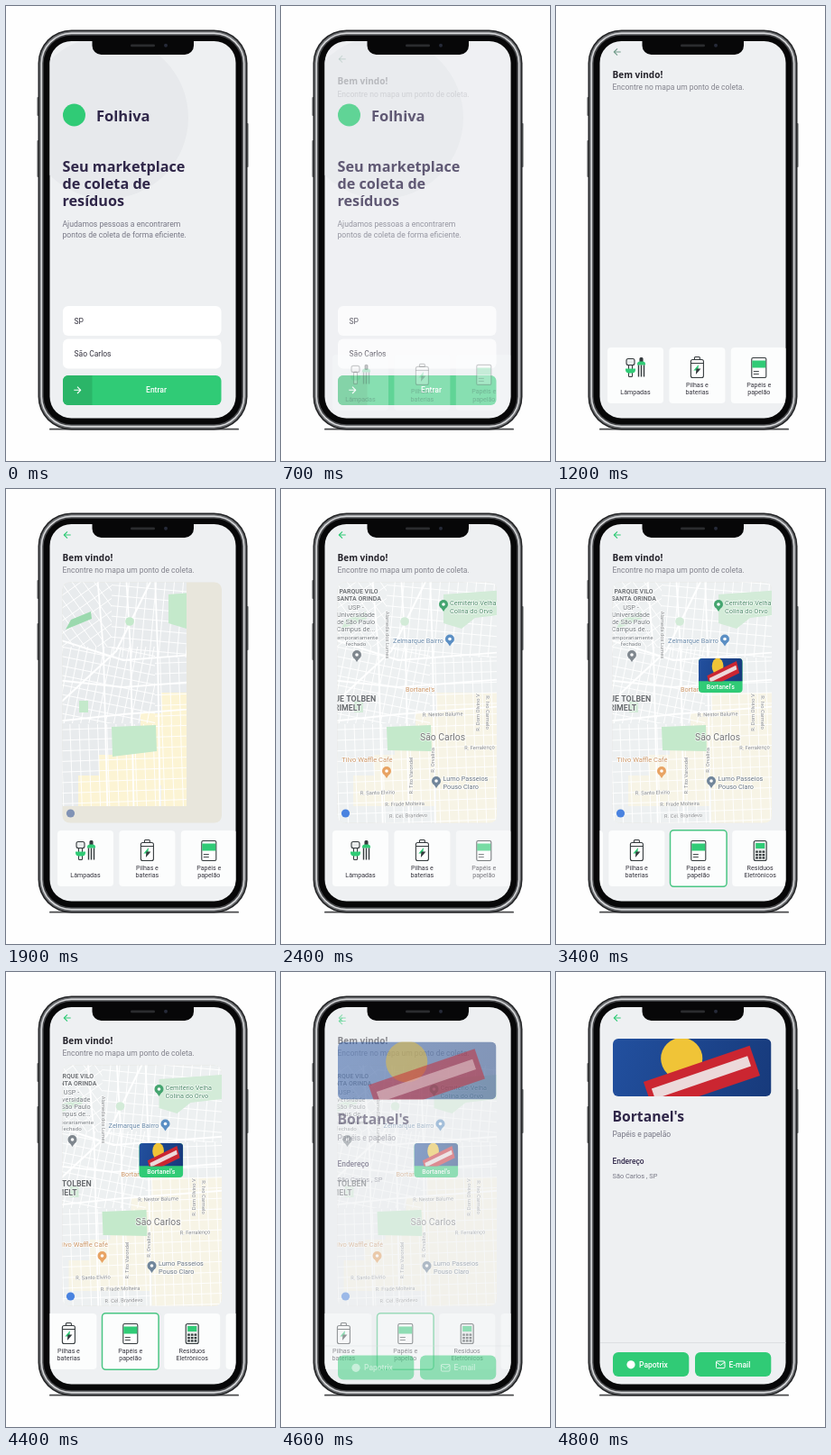
These frames come from a looping animation (298 px wide and 505 px high, 5.5 s). An HTML page with a canvas:

```html
<!DOCTYPE html>
<html lang="pt-BR">
<head>
<meta charset="utf-8">
<title>Coleta de resíduos</title>
<style>
html, body { margin: 0; width: 100%; height: 100%; overflow: hidden; background: #fefefe; }
canvas { display: block; width: 100vw; height: 100vh; }
</style>
</head>
<body>
<canvas id="stage"></canvas>
<script>
const W = 298, H = 505, LOOP = 5500, TICK = 100;
const canvas = document.getElementById('stage');
const c = canvas.getContext('2d');
const SANS = 'Roboto, sans-serif', HEAD = '"Noto Sans", sans-serif';
const GREEN = '#30cb76', INK = '#302749', GREY = '#777785', DARK = '#343a3d', PAGE = '#eef0f2';
const LEFT = 63, WIDTH = 175.5;
const SHOP = "Bortanel's";
const bold = { weight: 700, font: HEAD };

// Progress of a move that shows `count` ticks from `start`, waits, then settles at `end`
function burst(t, start, count, end) {
  if (t < start) return 0;
  if (t >= end) return 1;
  return Math.min(count, Math.floor((t - start) / TICK) + 1) / (count + 1);
}
const easeOut = p => 1 - Math.pow(1 - p, 1.78);

// ---- drawing helpers ----

function layer(draw, alpha = 1) {
  c.save();
  c.globalAlpha *= alpha;
  draw();
  c.restore();
}

function at(x, y, angle, draw) {
  layer(() => {
    c.translate(x, y);
    c.rotate(angle);
    draw();
  });
}

function box(x, y, w, h, r, fill, stroke, width = 1) {
  c.beginPath();
  c.roundRect(x, y, w, h, r);
  if (fill) { c.fillStyle = fill; c.fill(); }
  if (stroke) { c.strokeStyle = stroke; c.lineWidth = width; c.stroke(); }
}

function clipBox(x, y, w, h, r, draw) {
  layer(() => {
    box(x, y, w, h, r);
    c.clip();
    draw();
  });
}

function disc(x, y, r, fill) {
  c.beginPath();
  c.arc(x, y, r, 0, 7);
  c.fillStyle = fill;
  c.fill();
}

function trace(pts) {
  c.beginPath();
  for (let i = 0; i < pts.length; i += 2) c.lineTo(pts[i], pts[i + 1]);
}

function poly(pts, fill) {
  trace(pts);
  c.fillStyle = fill;
  c.fill();
}

function line(pts, color, width = 1) {
  trace(pts);
  c.strokeStyle = color;
  c.lineWidth = width;
  c.stroke();
}

function text(s, x, y, size, color, { weight = 400, font = SANS, align = 'left', halo = 0, gap = size * 1.2 } = {}) {
  c.font = `${weight} ${size}px ${font}`;
  c.textAlign = align;
  c.strokeStyle = 'rgba(255,255,255,.8)';
  c.lineWidth = halo;
  c.fillStyle = color;
  s.split('\n').forEach((row, i) => {
    if (halo) c.strokeText(row, x, y + i * gap);
    c.fillText(row, x, y + i * gap);
  });
}

function arrow(x, y, dir, color) {
  const r = 3.7;
  line([x - dir * r, y, x + dir * r, y], color, 1.1);
  line([x, y - r, x + dir * r, y, x, y + r], color, 1.1);
}

function page() {
  c.fillStyle = PAGE;
  c.fillRect(45, 36, 214, 426);
}

// ---- phone ----

function phoneBody() {
  box(48, 468.8, 210, 1.8, 1, '#4a4b4d');
  box(34.4, 101, 2, 21, 1, '#707275');
  box(34.4, 149, 2, 41, 1, '#707275');
  box(266.6, 130, 2, 49, 1, '#707275');
  ['#232426', '#6f7174', '#d9dadc', '#47484b', '#070708'].forEach((color, i) => {
    const inset = i * 1.55;
    box(35.5 + inset, 26.5 + inset, 232 - 2 * inset, 444 - 2 * inset, 37 - inset, color);
  });
}

function notch() {
  box(95.5, 36, 112.5, 18, [0, 0, 10, 10], '#070708');
  box(138, 42.6, 27, 2.6, 1.3, '#2b2c2f');
  disc(177, 43.8, 2, '#262a38');
}

// ---- home screen ----

function home() {
  page();
  disc(112, 124, 90, '#e7e9ec');
  disc(75.5, 121, 12.5, GREEN);
  text('Folhiva', 100, 127.5, 16.5, INK, bold);
  text('Seu marketplace\nde coleta de\nresíduos', 62.5, 183.5, 16.2, INK, bold);
  text('Ajudamos pessoas a encontrarem\npontos de coleta de forma eficiente.', 62.5, 244.5, 8.6, GREY, { gap: 12.7 });
  ['SP', 'São Carlos'].forEach((s, i) => {
    box(LEFT, 333 + i * 36.5, WIDTH, 33, 6, '#fff');
    text(s, 75.5, 352.6 + i * 36.5, 8.5, '#35333f');
  });
  box(LEFT, 410, WIDTH, 33, 6, GREEN);
  box(LEFT, 410, 32.5, 33, [6, 0, 0, 6], '#2bb568');
  arrow(79, 426.3, 1, '#fff');
  text('Entrar', 166.5, 429.3, 8.5, '#fff', { weight: 500, align: 'center' });
}

// ---- map ----

function grid(x, y, w, h, angle, step) {
  clipBox(x, y, w, h, 0, () => at(x, y, angle, () => {
    for (let d = -280; d < 280; d += step) {
      line([d, -280, d, 280], '#fff', .9);
      line([-280, d * 1.15, 280, d * 1.15], '#fff', .9);
    }
  }));
}

function ground(labelled) {
  const park = '#c4e9cb', pale = labelled ? '#d3ebd8' : park;
  c.fillStyle = labelled ? '#edf0f1' : '#e8ebed';
  c.fillRect(55, 95, 205, 285);
  // shopping area, widening in steps towards the south
  c.fillStyle = labelled ? '#f7f4e6' : '#fcf4d4';
  for (let i = 0; i < 5; i++) c.fillRect(172 - i * 23, 226 + i * 23, 90, 34);
  c.fillRect(172, 226, 90, 150);
  grid(55, 95, 62, 80, -.62, 10);
  grid(117, 95, 145, 92, .09, 10);
  grid(55, 175, 110, 85, .2, 9);
  grid(165, 187, 95, 75, -.035, 10.2);
  grid(55, 261, 205, 120, -.035, 10.2);
  for (let i = 0; i < 3; i++) {
    line([55, 166 + i * 46, 130, 190 + i * 30, 260, 180 + i * 30], '#fff', 1.9);
    line([101 + i * 32, 95, 108 + i * 30, 180, 113 + i * 29, 380], '#fff', 1.8);
  }
  line([55, 242, 122, 180, 164, 95], '#fff', 2);
  poly([66, 156, 72, 145, 94, 136, 95, 144], labelled ? pale : '#9bd9ae');
  disc(137, 147, 4.8, pale);
  poly([180, 117, 250, 112, 250, 139, 215, 143, 200, 155, 180, 149], pale);
  box(81, 235, 10, 13, 0, pale);
  poly([117, 264, 166, 262, 167, 291, 118, labelled ? 290 : 297], park);
}

function pin(x, y, color) {
  poly([x - 4.3, y + 1.5, x + 4.3, y + 1.5, x, y + 8], color);
  disc(x, y, 5, color);
  disc(x, y, 1.8, '#fff');
}

function street(s, x, y, angle = -.03) {
  at(x, y, angle, () => text(s, 0, 2, 5.8, '#85888b', { align: 'center', halo: 1.2 }));
}

function places() {
  const up = -Math.PI / 2;
  street('R. Nestor Balume', 179, 250);
  street('R. Ferralenço', 220, 287);
  street('R. Santo Elvírio', 107, 337);
  street('R. Frade Molteira', 137, 349.5);
  street('R. Cel. Brandevo', 141, 362.5);
  street('R. Orvalina', 168, 301, up);
  street('R. Tito Varondel', 144, 318, up);
  street('R. Dom Olvino V', 218, 248, up);
  street('R. Ivo Carmelo', 229, 248, -up);
  street('Alameda dos Lumes', 118, 162, -up);

  const left = { halo: 1.5 }, right = { halo: 1.5, align: 'right' };
  const mid = { halo: 1.5, align: 'center' }, area = { ...mid, weight: 700 };
  text('PARQUE VILO\nSANTA ORINDA', 86, 116, 7, '#6f7377', area);
  text('USP -\nUniversidade\nde São Paulo\nCampus de...', 83, 133.5, 7.3, '#747a7f', { ...mid, gap: 8.3 });
  text('Temporariamente\nfechado', 83, 166.5, 6.2, '#747a7f', mid);
  pin(84, 184, '#7f878e');
  text('PARQUE TOLBEN\nGRIMELT', 71, 235.5, 8.8, '#666a6e', area);
  text('São Carlos', 179, 279, 10.4, '#747474', mid);

  pin(180, 128, '#45a570');
  text('Cemitério Velha\nColina do Orvo', 187, 129, 7.3, '#4b8a68', left);
  text('Zelmarque Bairro', 180, 171, 7.3, '#6788a8', right);
  pin(187, 166.5, '#5b8fc4');
  text('Tilvo Waffle Café', 123.5, 302.5, 7.5, '#cb9565', right);
  pin(117, 313, '#e8a363');
  text(SHOP, 138, 225, 7.3, '#cb9565', left);
  pin(172, 324, '#71869b');
  text('Lumo Passeios\nPouso Claro', 179.5, 324, 7.3, '#6a7784', left);
}

function photo(x, y, w, h, r) {
  clipBox(x, y, w, h, r, () => {
    c.translate(x, y);
    c.scale(w / 175, h / 64);
    const sky = c.createLinearGradient(0, 0, 175, 64);
    sky.addColorStop(0, '#22509f');
    sky.addColorStop(1, '#173a7b');
    c.fillStyle = sky;
    c.fillRect(0, 0, 175, 64);
    disc(76, 22, 23, '#f0c437');
    at(98, 44, -.33, () => {
      box(-62, -17, 124, 35, 0, '#cb2631');
      box(-56, -7, 112, 12, 0, '#ecd9da');
    });
  });
}

function marker() {
  box(158, 188, 48.6, 38, 4, GREEN);
  photo(158, 188, 48.6, 25.5, [4, 4, 0, 0]);
  text(SHOP, 182.3, 222, 7, '#fff', { weight: 500, align: 'center' });
}

function map(t, pan) {
  const labelled = t >= 2300;
  clipBox(62.5, 103.5, 176.5, 267, 8, () => {
    c.fillStyle = '#e8e6dc';
    c.fillRect(62, 103, 178, 268);
    // only part of the tiles has arrived before the labels
    const [w, h] = labelled ? [178, 268] : [138, 249];
    clipBox(62, 103, w, h, 0, () => {
      c.translate(-10.5 * pan, 2 * pan);
      ground(labelled);
      if (labelled) places();
      if (t >= 2500) marker();
    });
    disc(71.5, 360, 4.6, labelled ? '#4a83e0' : '#8193b5');
  });
}

// ---- category cards (icons are drawn around the origin) ----

const outline = (x, y, w, h, r, fill = '#fff') => box(x, y, w, h, r, fill, DARK, 1.1);

function lamps() {
  outline(-10, -10, 9, 7, 2, '#e9ecec');
  outline(-7.5, -3, 4, 13, 1);
  box(-11, 1, 11, 5, [0, 0, 4, 4], GREEN);
  outline(5, -11, 3, 5, 1, DARK);
  box(2, -7, 9, 4, [3, 3, 0, 0], GREEN);
  for (let i = 0; i < 3; i++) line([3.5 + i * 3, -3, 3.5 + i * 3, 10], DARK, 1.4);
}

function battery() {
  outline(-3, -12, 6, 3, 1);
  outline(-7, -9, 14, 20, 2);
  line([-7, -5, 7, -5], DARK);
  for (const s of [1, -1])
    poly([s * 1.5, 2 - s * 5.5, -s * 4, 2 + s, s, 2 + s], s > 0 ? GREEN : DARK);
}

function paper() {
  outline(-8, -11, 16, 22, 1.5);
  box(-7.5, -8, 15, 8, 0, GREEN);
  for (const y of [4, 7]) line([-6, y, 0, y], DARK, .9);
}

function device() {
  outline(-7, -11, 14, 22, 2, '#e4e8e7');
  box(-5, -8.5, 10, 6, 0, GREEN);
  for (let i = 0; i < 9; i++)
    box(-5 + (i % 3) * 3.7, Math.floor(i / 3) * 3.4, 2.6, 2.3, .4, DARK);
}

const CARDS = [
  [lamps, 'Lâmpadas'],
  [battery, 'Pilhas e\nbaterias'],
  [paper, 'Papéis e\npapelão'],
  [device, 'Resíduos\nEletrônicos'],
  [() => {}, '']
];

function cards(t, scroll) {
  CARDS.forEach(([icon, label], i) => {
    const chosen = i === 2;
    const pressed = chosen && (t === 2400 || t === 2900);
    layer(() => {
      c.translate(57 + i * 68.4 - scroll, 379);
      box(0, 0, 62, 62, 4, '#fcfdfd');
      if (chosen && t >= 2500) box(-.3, -.3, 62.6, 62.6, 4, null, '#4bc684', 1.5);
      at(31, 22.5, 0, icon);
      const y = label.includes('\n') ? 43.5 : 51.8;
      text(label, 31, y, 7.1, '#35343e', { align: 'center', gap: 8.3 });
    }, pressed ? .65 : 1);
  });
}

function points(t) {
  const swipe = easeOut(burst(t, 2900, 3, 3400));
  const drag = easeOut(burst(t, 4100, 1, 4400));
  page();
  arrow(68, 51, -1, t < 1900 ? '#729c8b' : GREEN);
  text('Bem vindo!', 62.5, 79.5, 10, '#25232b', bold);
  text('Encontre no mapa um ponto de coleta.', 62.5, 93.3, 8.5, '#82828c');
  if (t >= 1900) map(t, drag);
  cards(t, 67 * swipe + 20 * drag);
}

// ---- detail screen ----

function detail() {
  const label = { weight: 500 };
  page();
  arrow(68, 51, -1, GREEN);
  photo(LEFT, 74, WIDTH, 64, 6);
  text(SHOP, 62.5, 165.5, 15.7, INK, bold);
  text('Papéis e papelão', 62.5, 183.3, 8.5, GREY);
  text('Endereço', 62.5, 212.5, 8.4, INK, label);
  text('São Carlos , SP', 62.5, 229, 7.4, GREY);
  line([49, 411.5, 255, 411.5], '#d9dbdf', .8);
  for (const x of [LEFT, 154]) box(x, 422, 84.3, 27, 6, GREEN);
  disc(83, 435.8, 4.6, '#fff');
  text('Papotrix', 92, 438.8, 8.5, '#fff', label);
  box(177.5, 432, 9.5, 7.6, 1, null, '#fff');
  line([177.5, 433, 182.2, 436.5, 187, 433], '#fff');
  text('E-mail', 191.5, 438.8, 8.5, '#fff', label);
}

// New screens fade in while rising slightly
function enter(p, draw) {
  layer(() => {
    c.translate(0, 14 * (1 - p) ** 2);
    draw();
  }, p);
}

function render(now) {
  const t = Math.floor((now % LOOP) / TICK) * TICK;
  const scale = window.devicePixelRatio || 1;
  const w = Math.round(innerWidth * scale), h = Math.round(innerHeight * scale);
  if (canvas.width !== w || canvas.height !== h) {
    canvas.width = w;
    canvas.height = h;
  }
  c.setTransform(w / W, 0, 0, h / H, 0, 0);
  c.lineJoin = 'round';
  c.fillStyle = '#fefefe';
  c.fillRect(0, 0, W, H);
  phoneBody();
  clipBox(48.5, 39, 206, 418.5, 24, () => {
    const list = burst(t, 700, 3, 1200), info = burst(t, 4500, 3, 4800);
    if (list < 1) home();
    if (list > 0 && info < 1) enter(list, () => points(t));
    if (info > 0) enter(info, detail);
  });
  notch();
}

const start = performance.now();
function loop() {
  render(performance.now() - start);
  requestAnimationFrame(loop);
}
loop();
</script>
</body>
</html>
```
